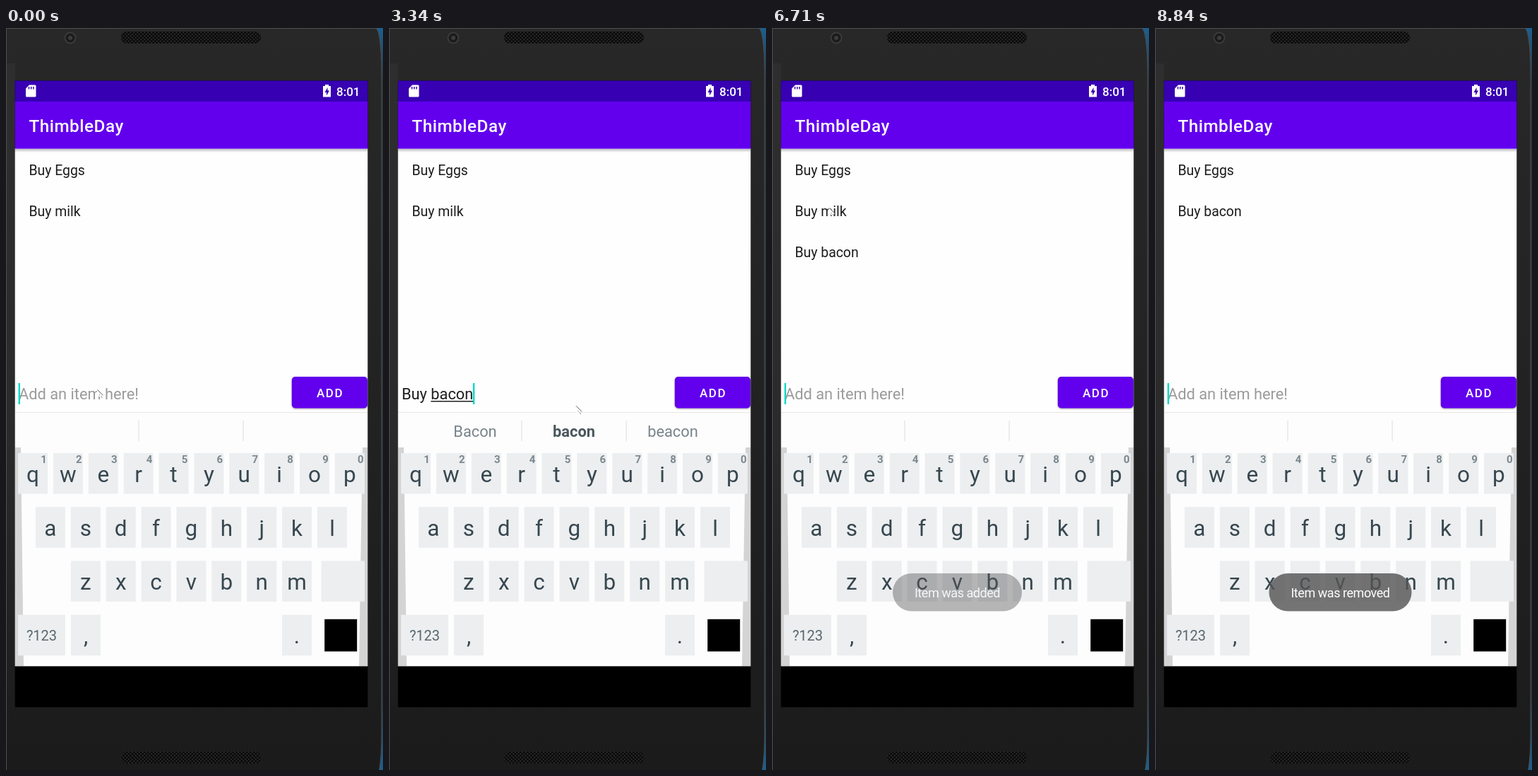
An HTML page for the animation above (8.94 s loop, 534 px wide and 1049 px high).

```html
<!DOCTYPE html>
<html lang="en">
<head>
<meta charset="utf-8">
<title>To-do list</title>
<style>
  html, body { margin: 0; width: 100%; height: 100%; overflow: hidden; background: #1f1f1f; }
  svg { display: block; width: 100%; height: 100%; }
  text { font-family: Roboto, sans-serif; white-space: pre; }
  .bar { fill: #fff; font-weight: 500; }
  .item { font-size: 19.4px; fill: #1c1c1c; }
  .entry { font-size: 21.8px; fill: #1f1f1f; }
  .tip { font-size: 21.8px; fill: #79848a; text-anchor: middle; }
  .key { font-size: 31.5px; fill: #37474f; text-anchor: middle; }
  .digit { font-size: 15px; font-weight: 700; fill: #7b888e; text-anchor: middle; }
  .toast { font-size: 18px; letter-spacing: -.45px; fill: #fff; text-anchor: middle; }
</style>
</head>
<body>
<svg viewBox="0 0 534 1049">
  <defs>
    <linearGradient id="desk" x2="0" y2="1">
      <stop stop-color="#1c5f8f"/><stop offset=".08" stop-color="#2b3338"/>
      <stop offset=".9" stop-color="#2b3338"/><stop offset="1" stop-color="#1c5f8f"/>
    </linearGradient>
    <linearGradient id="body" x2="0" y2="1">
      <stop stop-color="#282828"/><stop offset=".5" stop-color="#222"/><stop offset="1" stop-color="#1b1b1b"/>
    </linearGradient>
    <linearGradient id="side" x2="0" y2="1">
      <stop stop-color="#2e2e2e"/><stop offset=".6" stop-color="#2a2a2a"/><stop offset="1" stop-color="#1d1d1d"/>
    </linearGradient>
    <linearGradient id="fade" x2="0" y2="1">
      <stop stop-color="#000" stop-opacity=".25"/><stop offset="1" stop-color="#000" stop-opacity="0"/>
    </linearGradient>
    <pattern id="mesh" width="5" height="5" patternUnits="userSpaceOnUse">
      <rect width="5" height="5" fill="#0c0c0c"/>
      <circle cx="1.3" cy="1.3" r="1" fill="#333"/><circle cx="3.8" cy="3.8" r="1" fill="#333"/>
    </pattern>
  </defs>

  <rect width="534" height="1049" fill="url(#desk)"/>
  <rect x="-40" y=".5" width="572" height="1060" rx="8" ry="60" fill="url(#body)" stroke="#505050"/>
  <rect x="1" y="50" width="12" height="910" fill="url(#side)"/>
  <path d="M.5 0V1049" stroke="#505050"/>
  <circle cx="91" cy="14" r="7.5" fill="#1b1b1b" stroke="#3b3b3b" stroke-width="2"/>
  <circle cx="91" cy="14" r="3" fill="#3c3c3c"/>
  <rect x="163" y="5" width="198" height="17" rx="8" fill="url(#mesh)"/>
  <rect x="163" y="1023" width="198" height="17" rx="8" fill="url(#mesh)"/>

  <rect x="12.7" y="74.5" width="499.6" height="885.7"/>
  <rect x="12.7" y="170" width="499.6" height="732.3" fill="#fefefe"/>
  <rect x="12.7" y="74.5" width="499.6" height="30" fill="#3700b3"/>
  <rect x="12.7" y="104" width="499.6" height="66.7" fill="#6200ee"/>
  <rect x="13" y="171" width="499" height="5" fill="url(#fade)"/>
  <path d="M33 80.5H41Q42.5 80.5 42.5 82V96Q42.5 97.5 41 97.5H29.5Q28 97.5 28 96V85.5Z" fill="#fff"/>
  <path d="M32.5 83v3.5M35.7 83v3.5M38.9 83v3.5" stroke="#3700b3" stroke-width="1.5"/>
  <path d="M449 82H452V80H457V82H460V97.5H449Z" fill="#fff"/>
  <path d="M455.5 84L451.5 91H454V95.5L458 88.500H455.5Z" fill="#3700b3"/>
  <text class="bar" x="468" y="96" font-size="17">8:01</text>
  <text class="bar" x="32.5" y="147" font-size="24.3" letter-spacing=".5">ThimbleDay</text>

  <text class="item" x="32.5" y="208">Buy Eggs</text>
  <text class="item" x="32.5" y="266" id="milk">Buy milk</text>
  <text class="item" x="32.5" id="bacon">Buy bacon</text>

  <text class="entry" x="18" y="525" id="hint" style="fill:#9b9b9b">Add an item here!</text>
  <text class="entry" x="18" y="525" id="entry"></text>
  <rect id="underline" y="527" height="1.5" fill="#1f1f1f"/>
  <rect id="caret" y="502" width="2.4" height="30" fill="#03dac5"/>

  <rect id="button" x="404.8" y="493" width="107.2" height="44.5" rx="4.8"/>
  <text class="bar" x="440" y="522" font-size="17" letter-spacing="1.52">ADD</text>

  <rect x="13" y="544" width="499" height="358" fill="#fdfdfd"/>
  <path d="M13 543.5H512" stroke="#e6e6e6"/>
  <path d="M188 555V584M336 555V584" stroke="#dcdcdc"/>
  <g id="tips"></g>
  <path d="M13 593H21L25 902H13ZM512 593H505L500 902H512Z" fill="#d4d4d4"/>
  <g id="keys"></g>
  <rect x="451.2" y="835.8" width="46" height="45.6"/>

  <g id="toast">
    <rect y="771" height="53.5" rx="26.7" fill="#555" fill-opacity=".9"/>
    <text class="toast" x="262.5" y="805"></text>
  </g>

  <g id="mouse">
    <path d="M0 0V12.5L3 9.8 5 14 7 13.2 5 9H9Z" fill="#fff"/>
    <path d="M.5 .8L8.5 8.8" stroke="#444" stroke-width=".9"/>
    <path d="M2.8 8.5l1.5 -.5M5.5 9.5l1.8 3.2" stroke="#777" stroke-width=".8"/>
  </g>
</svg>
<script>
const LOOP = 8940;
const TAP = 4280;       // the ADD button is pressed
const CLEARED = 4420;   // the field empties
const ADDED = 4700;     // the new row and its toast appear
const REMOVED = 7000;   // the long-pressed row goes
const BLINK = 512;

const $ = id => document.getElementById(id);
const ramp = (t, start, length) => Math.min(1, Math.max(0, (t - start) / length));
const easeInOut = p => (1 - Math.cos(p * Math.PI)) / 2;
const mix = (from, to, p) => from + (to - from) * p;

function add(parent, tag, attrs, label = '') {
  const el = document.createElementNS(parent.namespaceURI, tag);
  for (const name in attrs) el.setAttribute(name, attrs[name]);
  el.textContent = label;
  parent.append(el);
  return el;
}

// Keyboard
const PITCH = 49.88;
const rowY = row => 601 + row * 76.2;

function addKey(x, row, label, width = 42, style = '') {
  add($('keys'), 'rect', { x, y: rowY(row), width, height: 57.5, fill: '#eceef0' });
  add($('keys'), 'text', { x: x + width / 2, y: rowY(row) + 40.5, class: 'key', style }, label);
}
['qwertyuiop', ' asdfghjkl', '  zxcvbnm'].forEach((letters, row) => {
  const left = row === 1 ? 17 - PITCH / 2 : row ? 17 - PITCH / 2 : 17;
  [...letters].forEach((letter, i) => {
    if (letter !== ' ') addKey(left + i * PITCH, row, letter);
  });
});
[...'1234567890'].forEach((digit, i) =>
  add($('keys'), 'text', { x: 53.5 + i * PITCH, y: 615, class: 'digit' }, digit));
addKey(446.5, 2, '', 61.5);
addKey(17, 3, '?123', 67, 'font-size:20px;fill:#59676e;translate:0 -4px');
addKey(92, 3, ',');
addKey(391, 3, '.');

const tips = [122, 262, 402].map(x => add($('tips'), 'text', { x, y: 578, class: 'tip' }));
tips[1].style.fill = '#4a575d';

// Suggestions trail the keys they answer
const words = [
  { text: 'Buy ', start: 1080, pace: 140, tips: ['By', 'Bu', 'But'], tipsOn: 1360, tipsOff: 1760 },
  { text: 'bacon', start: 2160, pace: 180, tips: ['Bacon', 'bacon', 'beacon'], tipsOn: 2700, tipsOff: ADDED }
];
const strokes = words.flatMap(word => [...word.text].map((_, i) => word.start + i * word.pace));
const caretResets = [280 - BLINK, ...strokes, TAP];

const mouseStart = { x: 129, y: 510.5 };
const mouseMoves = [
  { start: 3250, length: 90, x: 264.5, y: 533.5 },
  { start: 3450, length: 330, x: 434.5, y: 503 },
  { start: 4850, length: 630, x: 80.5, y: 253.5 },
  { start: 7300, length: 1220, x: 490, y: 1060 }
];

const toasts = [
  { text: 'Item was added', start: ADDED, width: 183 },
  { text: 'Item was removed', start: REMOVED, width: 202 }
];

function textWidth(text) {
  $('entry').textContent = text;
  return text ? $('entry').getComputedTextLength() : 0;
}

function drawEntry(t) {
  let before = '', current = '';
  for (const { text, start, pace } of words) {
    if (t < start || t >= CLEARED) break;
    const keys = Math.floor((t - start) / pace) + 1;
    before += current;
    current = text.slice(0, keys);
    if (text.endsWith(' ') && keys > text.length) {
      before += current;
      current = '';
    }
  }
  const from = 18 + textWidth(before);
  const to = 18 + textWidth(before + current.trimEnd());
  const end = 18 + textWidth(before + current);
  const sinceReset = t - caretResets.findLast(time => time <= t);
  $('underline').setAttribute('x', from);
  $('underline').setAttribute('width', to - from);
  $('caret').setAttribute('x', end - .4);
  $('caret').style.opacity = sinceReset % (2 * BLINK) < BLINK ? 1 : 0;
  $('hint').style.opacity = before + current ? 0 : 1;
}

function drawTips(t) {
  const word = words.find(({ tipsOn, tipsOff }) => t >= tipsOn && t < tipsOff);
  tips.forEach((tip, i) => {
    tip.textContent = word ? word.tips[i] : '';
    tip.style.fontWeight = i === 1 && tip.textContent === 'bacon' ? 700 : 400;
  });
}

function drawToast(t) {
  const { text, start, width } = t < REMOVED ? toasts[0] : toasts[1];
  const [box, label] = $('toast').children;
  box.setAttribute('x', 262.5 - width / 2);
  box.setAttribute('width', width);
  label.textContent = text;
  $('toast').style.opacity = ramp(t, start, 200) * (1 - ramp(t, start + 1800, 400));
}

function drawButton(t) {
  const press = ramp(t, TAP, 220) * (1 - ramp(t, 4650, 250));
  const blur = 1 + 2 * press;
  $('button').style.fill = `rgb(${mix(98, 145, press)},${mix(0, 77, press)},${mix(238, 242, press)})`;
  $('button').style.filter = `drop-shadow(0 ${blur}px ${blur}px rgba(0,0,0,.35))`;
}

function drawRows(t) {
  $('milk').style.opacity = 1 - ramp(t, REMOVED - 90, 120);
  $('bacon').style.opacity = t >= ADDED ? 1 : 0;
  $('bacon').setAttribute('y', mix(324, 266, easeInOut(ramp(t, REMOVED + 30, 250))));
}

function drawMouse(t) {
  let { x, y } = mouseStart;
  for (const move of mouseMoves) {
    const p = ramp(t, move.start, move.length);
    x = mix(x, move.x, p);
    y = mix(y, move.y, p);
  }
  $('mouse').setAttribute('transform', `translate(${x} ${y})`);
}

function draw() {
  const t = performance.now() % LOOP;
  for (const part of [drawEntry, drawTips, drawToast, drawButton, drawRows, drawMouse]) part(t);
  requestAnimationFrame(draw);
}
draw();
</script>
</body>
</html>
```
